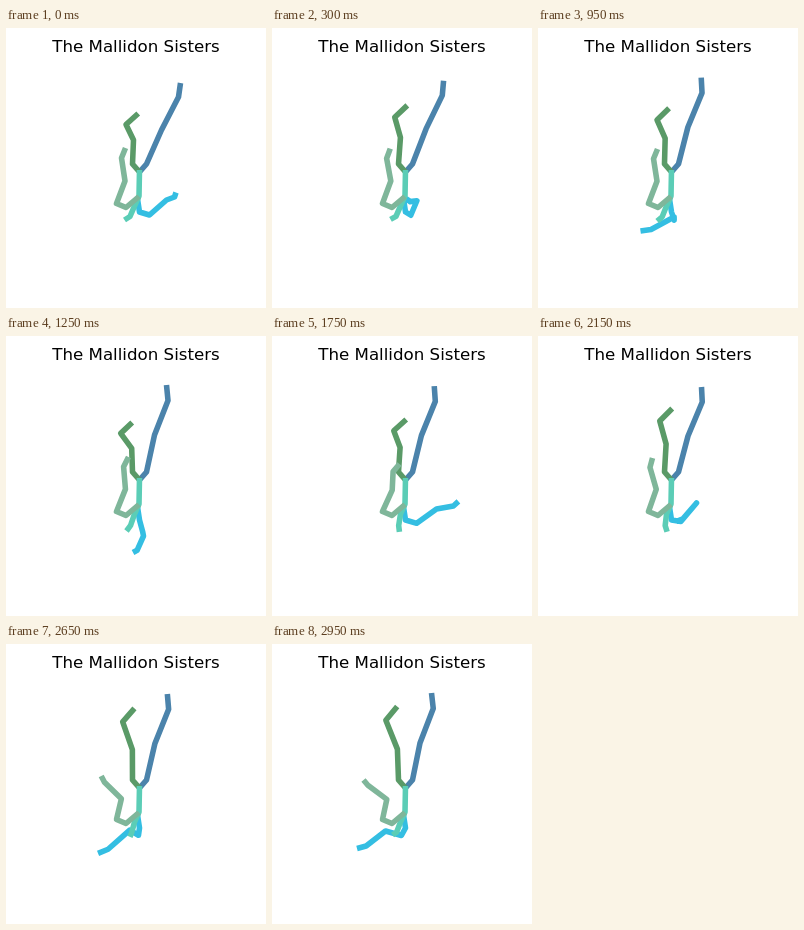
Write an HTML page that moves like this. It is 260x280 px and loops after 3000 ms.

```html
<!DOCTYPE html>
<html lang="en">
<head>
<meta charset="utf-8">
<style>
  html, body { margin: 0; width: 260px; height: 280px; overflow: hidden; background: #fff; }
  svg { display: block; }
  text { font: 16.67px "DejaVu Sans", sans-serif; text-anchor: middle; }
  polyline { fill: none; stroke-width: 5.56; stroke-linejoin: round; }
</style>
</head>
<body>
<svg width="260" height="280" viewBox="0 0 260 280">
  <text x="130" y="24">The Mallidon Sisters</text>
  <g transform="translate(.5 0)"></g>
</svg>
<script>
const LOOP = 3000, STEP = 50;

// Joints are [x, y, follow...]: a resting place, and how strongly the joint follows each guide.
// A guide is the path of a leading joint through a few [time, x, y] points.
const limbs = [
  { color: '#34bee2',
    joints: [[131, 171], [133, 184], [143, 187, 0, .3], [160, 172, 0, 1], [168, 169, .72, .28], [169.5, 164.5, 1]],
    guides: [
      [[0, 169, 165], [600, 106, 179], [850, 99, 197], [1250, 126, 217], [1670, 188, 165],
       [2150, 137, 186], [2400, 110, 207], [2700, 89, 210], [2950, 84, 205]],
      [[0, 160, 172], [600, 135, 174], [1250, 137, 200], [1750, 164, 173],
       [2150, 158, 167], [2400, 134, 185], [2950, 113, 187]]
    ] },
  { color: '#4b83ab',
    joints: [[133, 144], [140, 136], [155, 102, .5], [172, 69, .75], [174, 55, 1]],
    guides: [[[0, 174, 55], [600, 168, 51], [1250, 160, 49], [2150, 163, 51], [2950, 159, 49]]] },
  { color: '#5a9a67',
    joints: [[133, 144], [126, 136], [127, 112, .3], [119.5, 96.5, .88], [131.7, 85.5, 1]],
    guides: [[[0, 131, 86], [600, 136, 73], [1250, 125, 87], [1750, 133, 84],
              [2150, 133, 73], [2400, 130, 67], [2950, 124, 63]]] },
  { color: '#5bcdb6',
    joints: [[133, 142], [132.5, 168], [128, 178], [123.5, 188.5, .3], [118, 192, 1]],
    guides: [[[0, 118, 192], [600, 118, 191], [1250, 120, 195], [2000, 129, 196], [2950, 120, 191]]] },
  { color: '#7fb69a',
    joints: [[132.5, 168.5], [119.5, 179.5], [110, 175.5], [118.5, 153, .15], [115, 130, .7], [119, 120, 1]],
    guides: [[[0, 119, 120], [600, 117, 121], [1250, 122, 121], [1750, 127, 128],
              [2150, 114, 122], [2400, 99, 128], [2950, 91, 136]]] }
];

const group = document.querySelector('g');
for (const limb of limbs) {
  limb.line = document.createElementNS(group.namespaceURI, 'polyline');
  limb.line.setAttribute('stroke', limb.color);
  group.append(limb.line);
}

// Travel along a guide's axis (1 = x, 2 = y) since time 0: monotone cubic, without overshoot.
function travel(guide, axis, t) {
  const last = guide.length - 1;
  let i = 0;
  while (i < last - 1 && t >= guide[i + 1][0]) i++;
  const slope = k => (guide[k + 1][axis] - guide[k][axis]) / (guide[k + 1][0] - guide[k][0]);
  const tangent = k => {
    const a = slope(Math.max(k - 1, 0)), b = slope(Math.min(k, last - 1));
    return a * b > 0 ? 2 * a * b / (a + b) : 0;
  };
  const [from, to] = [guide[i], guide[i + 1]];
  const span = to[0] - from[0], u = (t - from[0]) / span, v = 1 - u;
  return from[axis] * (1 + 2 * u) * v * v + to[axis] * u * u * (3 - 2 * u)
    + span * u * v * (tangent(i) * v - tangent(i + 1) * u) - guide[0][axis];
}

function draw(now) {
  const t = Math.floor(now % LOOP / STEP) * STEP;
  for (const { line, joints, guides } of limbs) {
    const moves = guides.map(guide => [travel(guide, 1, t), travel(guide, 2, t)]);
    const points = joints.map(([x, y, ...follow]) => {
      follow.forEach((weight, k) => {
        x += weight * moves[k][0];
        y += weight * moves[k][1];
      });
      return `${x.toFixed(2)},${y.toFixed(2)}`;
    });
    line.setAttribute('points', points.join(' '));
  }
}

const start = performance.now();
function tick() {
  draw(performance.now() - start);
  requestAnimationFrame(tick);
}
tick();
</script>
</body>
</html>
```
